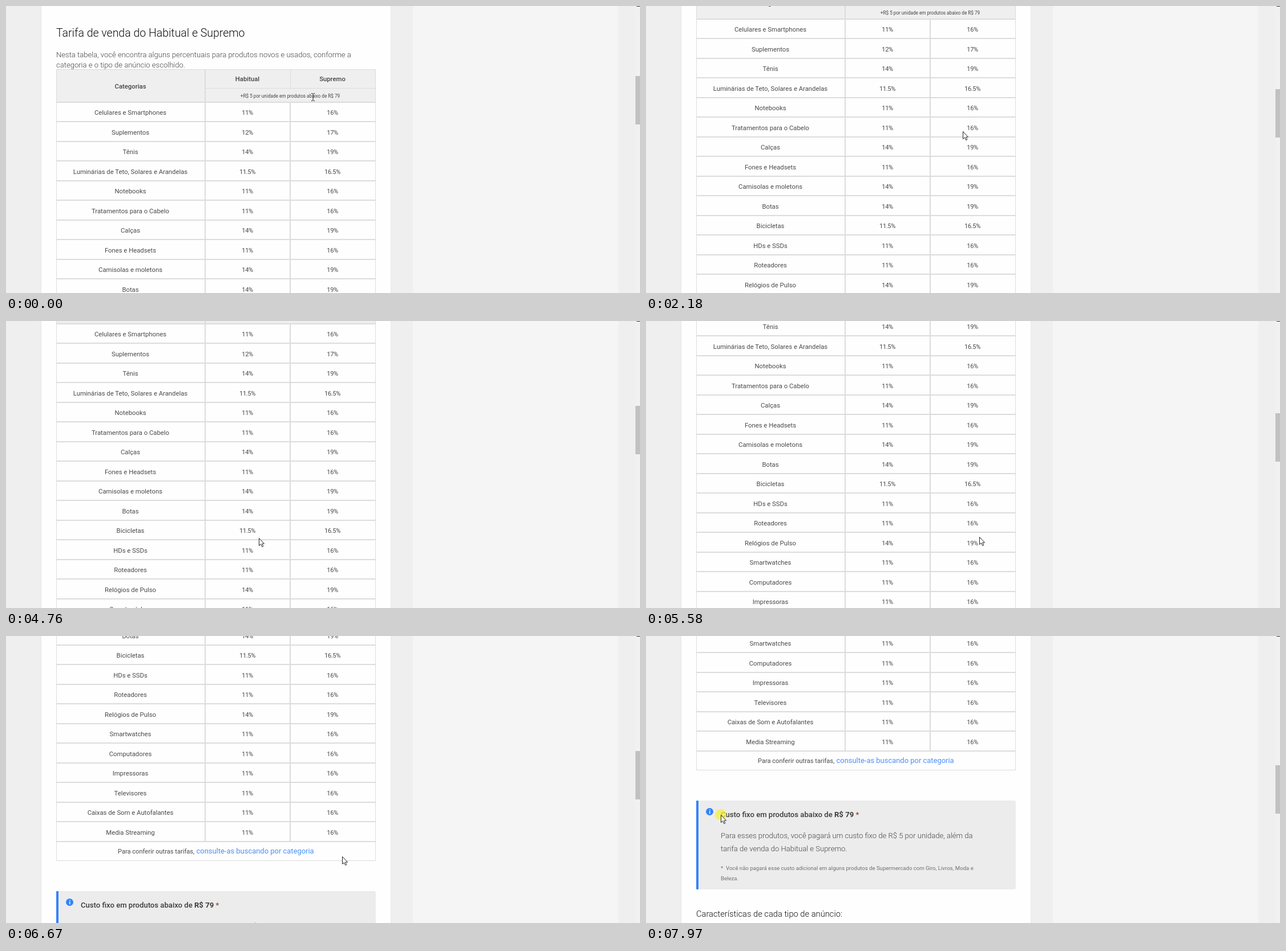
An HTML page that plays this animation: 1111x504 px, repeating every 8 s.

```html
<!DOCTYPE html>
<html lang="pt-BR">
<head>
<meta charset="utf-8">
<title>Tabela de tarifas</title>
<style>
  html, body { margin: 0; width: 100%; height: 100%; overflow: hidden; background: #efefef; }
  svg { display: block; }
  text { font-family: Roboto, Inter, sans-serif; font-size: 11.3px; fill: #4a4a4a; white-space: pre; }
  .mid { text-anchor: middle; }
  .title { font-size: 19.5px; font-weight: 300; fill: #111; }
  .body { font-size: 13.05px; font-weight: 300; fill: #444; }
  .head { font-weight: 500; fill: #444; }
  .tiny { font-size: 8.2px; fill: #444; }
  .pct { font-size: 11.1px; letter-spacing: -.4px; }
  .foot { font-size: 11.1px; }
  .link { font-size: 12.95px; fill: #4a8ffa; }
  .strong { font-size: 13.1px; font-weight: 500; fill: #3c3c3c; }
  .note { font-size: 9.6px; fill: #707070; }
  .sub { font-size: 14.7px; font-weight: 300; fill: #111; }
</style>
</head>
<body>
<svg id="stage" width="1111" height="504" viewBox="0 0 1111 504">
  <rect width="1111" height="504" fill="#efefef"/>
  <rect x="61" width="614" height="504" fill="#e8e8e8"/>
  <rect x="62" width="612" height="504" fill="#fefefe"/>
  <rect x="713" width="360" height="504" fill="#f5f5f5"/>
  <rect x="1103" width="8" height="504" fill="#f1f1f1"/>
  <rect id="thumb" x="1103" width="8" height="85" fill="#c1c1c1"/>
  <rect x="1105" width="6" height="1" fill="#2b3048"/>
  <g id="page"></g>
  <g id="pointer">
    <circle id="halo" r="10" fill="#f6f03c"/>
    <path id="arrow" d="M.5 .5V13.5L3.5 10.8L5.7 15.5L7.8 14.6L5.7 10.1H9.5Z" fill="#fff" stroke="#222"/>
    <path id="beam" d="M-3 -6.5H-1L0 -5.5L1 -6.5H3M0 -5.5V5.5M-3 6.5H-1L0 5.5L1 6.5H3" fill="none" stroke="#222"/>
  </g>
</svg>
<script>
const $ = id => document.getElementById(id);
const page = $('page');
const LOOP = 8000, STEP = 82.1, ROW = 34.5, TOP = 169;
const LEFT = 88, RIGHT = 648, COL1 = 349, COL2 = 498;
const LINE = '#dcdcdc';

function add(tag, attrs, html = '') {
  const node = document.createElementNS('http://www.w3.org/2000/svg', tag);
  for (const key in attrs) node.setAttribute(key, attrs[key]);
  node.innerHTML = html;
  page.append(node);
}
const text = (x, y, cls, html) => add('text', { x, y, class: cls }, html);
const rect = (x, y, width, height, fill, rx = 0) => add('rect', { x, y, width, height, fill, rx });

// Categories with the lower rate; the second rate is always five points higher.
const rows = [
  ['Celulares e Smartphones', 11], ['Suplementos', 12], ['Tênis', 14],
  ['Luminárias de Teto, Solares e Arandelas', 11.5], ['Notebooks', 11],
  ['Tratamentos para o Cabelo', 11], ['Calças', 14], ['Fones e Headsets', 11],
  ['Camisolas e moletons', 14], ['Botas', 14], ['Bicicletas', 11.5], ['HDs e SSDs', 11],
  ['Roteadores', 11], ['Relógios de Pulso', 14], ['Smartwatches', 11], ['Computadores', 11],
  ['Impressoras', 11], ['Televisores', 11], ['Caixas de Som e Autofalantes', 11],
  ['Media Streaming', 11]
];
const tableEnd = TOP + rows.length * ROW;

function buildPage() {
  text(LEFT, 54, 'title', 'Tarifa de venda do Habitual e Supremo');
  text(LEFT, 90, 'body', 'Nesta tabela, você encontra alguns percentuais para produtos novos e usados, conforme a');
  text(LEFT, 108, 'body', 'categoria e o tipo de anúncio escolhido.');

  rect(LEFT, 112, RIGHT - LEFT, 57, '#efefef');
  rect(LEFT, 111, RIGHT - LEFT, 1, LINE);
  rect(COL1, 144, RIGHT - COL1, 1, LINE);
  rect(COL2, 112, 1, 32, LINE);
  text(218, 145, 'head mid', 'Categorias');
  text(423, 132, 'head mid', 'Habitual');
  text(572, 132, 'head mid', 'Supremo');
  text(498, 161, 'tiny mid', '+R$ 5 por unidade em produtos abaixo de R$ 79');

  rows.forEach(([name, rate], i) => {
    const y = Math.round(TOP + 22 + i * ROW);
    text(218, y, 'mid', name);
    text(423, y, 'pct mid', rate + '%');
    text(572, y, 'pct mid', rate + 5 + '%');
  });
  for (let i = 0; i <= rows.length; i++)
    rect(LEFT, Math.floor(TOP - 1 + i * ROW), RIGHT - LEFT, 2, LINE);
  rect(COL1 - 1, 112, 2, tableEnd - 112, LINE);
  rect(COL2 - 1, TOP, 2, tableEnd - TOP, LINE);
  rect(LEFT, 111, 1, 782, LINE);
  rect(RIGHT - 1, 111, 1, 782, LINE);
  rect(LEFT, 892, RIGHT - LEFT, 1, LINE);
  text(196, 880, 'foot', 'Para conferir outras tarifas,');
  text(333.5, 880, 'link', 'consulte-as buscando por categoria');

  rect(LEFT, 946, RIGHT - LEFT, 156, '#ececec', 3);
  rect(LEFT, 946, 4, 156, '#3483fa', 1);
  add('circle', { cx: 111.5, cy: 965.5, r: 6.5, fill: '#3483fa' });
  rect(111, 961.5, 1.4, 1.6, '#fff');
  rect(111, 964.3, 1.4, 5, '#fff');
  text(131, 975, 'strong', 'Custo fixo em produtos abaixo de <tspan font-weight="700">R$ 79</tspan> <tspan fill="#a5402d">*</tspan>');
  text(131, 1012, 'body', 'Para esses produtos, você pagará um custo fixo de R$ 5 por unidade, além da');
  text(131, 1035, 'body', 'tarifa de venda do Habitual e Supremo.');
  text(131, 1068, 'note', '*');
  text(140, 1068, 'note', 'Você não pagará esse custo adicional em alguns produtos de Supermercado com Giro, Livros, Moda e');
  text(131, 1086, 'note', 'Beleza.');
  text(LEFT, 1150, 'sub', 'Características de cada tipo de anúncio:');
}

// Keys are [time, ...values]; each stretch eases in and out.
function track(keys, t) {
  const next = keys.findIndex(k => k[0] > t);
  if (next < 0) return keys[keys.length - 1].slice(1);
  if (next === 0) return keys[0].slice(1);
  const a = keys[next - 1], b = keys[next];
  const u = (t - a[0]) / (b[0] - a[0]), e = u * u * (3 - 2 * u);
  return a.slice(1).map((v, i) => v + (b[i + 1] - v) * e);
}

// Wheel notches turned.
const wheel = [
  [930, 0], [1090, 1], [2070, 1], [2230, 2], [5400, 2], [5560, 3],
  [5860, 3], [6240, 5], [6470, 5], [6970, 8]
];
const path = [
  [20, 538, 160], [230, 626, 198], [930, 626, 198], [1120, 626, 198], [1730, 540, 212],
  [2570, 567, 226], [2920, 473, 280], [3360, 413, 298], [3800, 520, 376], [4180, 667, 340],
  [4260, 667, 336], [4760, 443, 381], [5060, 470, 381], [5400, 584, 379], [5860, 584, 379],
  [6240, 588, 385], [6670, 589, 387], [7290, 163, 318], [7340, 122, 312], [7380, 131, 314]
];

function draw(now) {
  const t = now % LOOP;
  const [notches] = track(wheel, t);
  const [x, y] = track(path, t).map(Math.round);
  page.setAttribute('transform', `translate(0 ${-Math.round(notches * STEP)})`);
  $('thumb').setAttribute('y', Math.round(123 + 13 * notches));
  $('pointer').setAttribute('transform', `translate(${x} ${y})`);
  const overText = t < 60;
  $('beam').setAttribute('visibility', overText ? 'visible' : 'hidden');
  $('arrow').setAttribute('visibility', overText ? 'hidden' : 'visible');
  $('halo').setAttribute('opacity', track([[7690, 0], [7900, .75]], t)[0]);
  requestAnimationFrame(draw);
}

buildPage();
draw(0);
</script>
</body>
</html>
```
